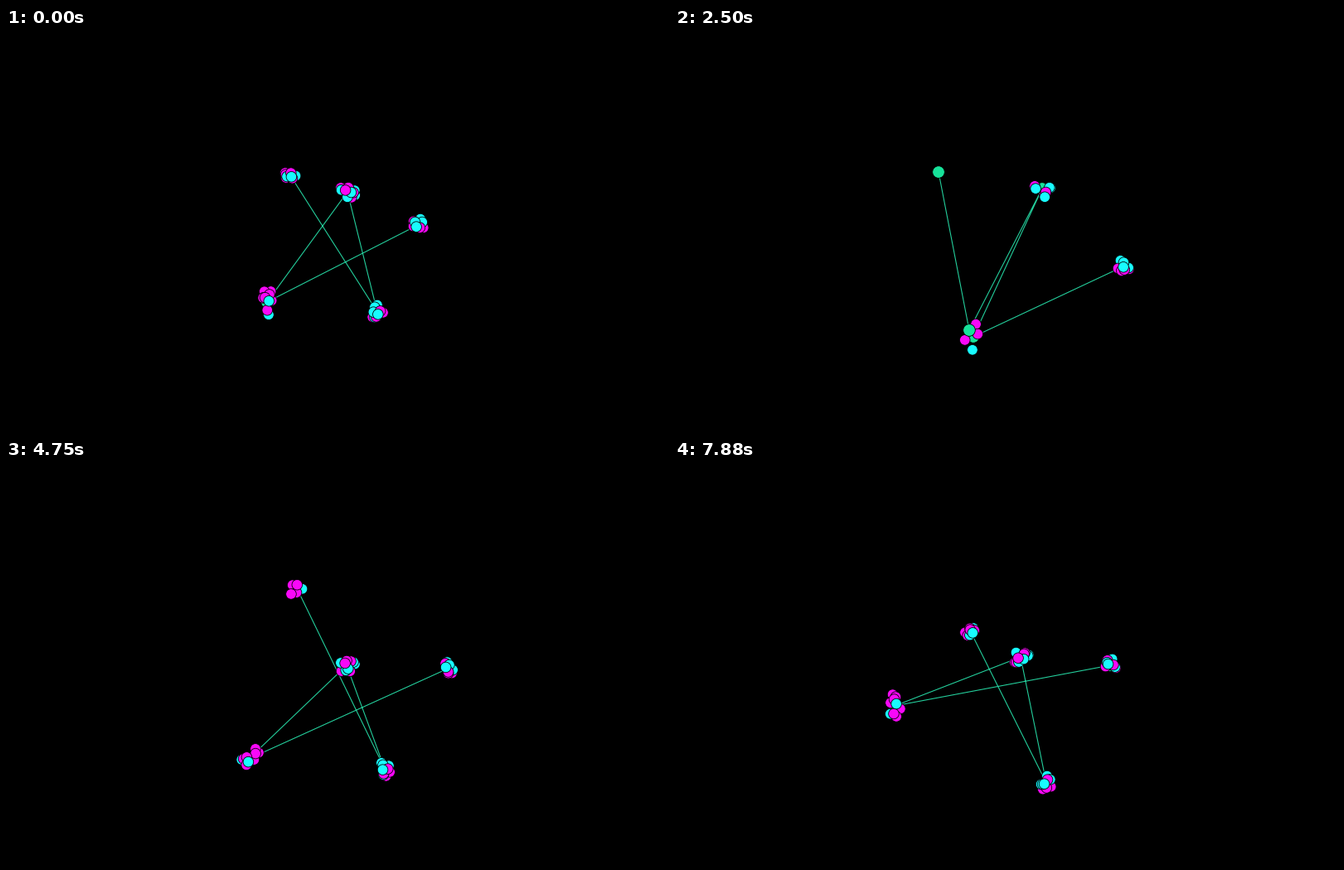
Recreate the animation shown at these times as a matplotlib script. Size 800 by 488 pixels, loop 8 s.

```python
import numpy as np
import matplotlib.pyplot as plt
from matplotlib.animation import FuncAnimation

W, H, DPI = 800, 488, 100
FRAMES, INTERVAL = 64, 125
HOLD_TICKS = 5
GREEN, LINE = "#17e29a", "#24cf9c"
DOT_COLORS = {"m": "#f808f8", "c": "#18fbff"}
NODE_R, DOT_R = 7.3, 6.3
TICKS = [9, 20, 27, 38, 48, 58, 63]


class Node:
    def __init__(self, seed, hold, points, extra, appears, colors, spread, first, step):
        self.hold = np.array(hold, float)
        self.appears = appears
        keys = [(t, *p) for t, p in zip(TICKS[-len(points):], points)] + extra
        keys = np.array(sorted(keys), float)
        self.times, self.pts = keys[:, 0], keys[:, 1:]
        self.slopes = np.gradient(self.pts, self.times, axis=0)
        rng = np.random.default_rng(seed)
        n = len(colors)
        k = np.arange(n)
        self.colors = [DOT_COLORS[c] for c in colors]
        self.born = first + np.maximum(0, k - 1) * step
        angle = 2.4 * k + rng.uniform(0, 6.28)
        self.base = (np.sqrt((n - k) / n) * np.exp(1j * angle))
        self.spread = spread
        self.entry = 32 * np.exp(1j * rng.uniform(0, 6.28, n))
        self.speed = rng.uniform(0.15, 0.4, n)
        self.phase = rng.uniform(0, 6.28, n)

    def center(self, t):
        """Smooth cubic curve through the waypoints."""
        times, pts, slopes = self.times, self.pts, self.slopes
        t = max(t, times[0])
        i = int(np.clip(np.searchsorted(times, t, "right") - 1, 0, len(times) - 2))
        span = times[i + 1] - times[i]
        u = (t - times[i]) / span
        return ((1 + 2 * u) * (1 - u) ** 2 * pts[i]
                + u * (1 - u) ** 2 * span * slopes[i]
                + u * u * (3 - 2 * u) * pts[i + 1]
                + u * u * (u - 1) * span * slopes[i + 1])

    def cluster(self, t):
        """Offsets of the dots once they have settled."""
        turn = np.exp(0.8j * np.sin(self.speed * t + self.phase))
        z = self.base * turn
        flat = z.real * self.spread[0] + 1j * z.imag * self.spread[1]
        if self.spread[1] > 2 * self.spread[0]:
            flat = flat * np.exp(1j * np.interp(t, [27, 38, 48, 60], [0, 0.7, 0.6, 0]))
        return flat

    def discs(self, t):
        held = t < HOLD_TICKS
        center = self.hold if held else self.center(t)
        out = [(center, NODE_R, GREEN)]
        settled = self.cluster(t)
        for k, color in enumerate(self.colors):
            if not held and t < self.born[k]:
                continue
            away = 0 if held else np.exp(-(t - self.born[k]) / 0.9)
            z = self.entry[k] * away + settled[k] * (1 - away)
            out.append((center + (z.real, z.imag), DOT_R, color))
        return out


nodes = [
    Node(1, (343, 178),
         [(318, 174), (320, 171), (351, 155), (333, 164), (350, 160), (357, 208)],
         [], 17, "mcmmmcmc", (7, 6), 28, 3),
    Node(2, (448, 343),
         [(355, 365), (377, 247), (457, 373), (492, 342), (462, 397), (448, 390)],
         [(12, 305, 262)], 12, "mcmccmcmc", (8, 9), 20.5, 1.5),
    Node(3, (412, 198),
         [(342, 157), (443, 194), (463, 213), (411, 248), (405, 291),
          (414, 254), (417, 238)],
         [], 8, "cmcmcmcmcm", (10, 10), 10, 1.7),
    Node(4, (315, 331),
         [(394, 323), (360, 373), (368, 417), (293, 361), (320, 403),
          (312, 330), (265, 297)],
         [(6, 380, 455), (11, 300, 350), (22, 264, 370), (34, 290, 362)],
         6, "mcmmmmmmc", (7, 17), 9, 3.3),
    Node(5, (497, 238),
         [(544, 264), (541, 288), (533, 330), (533, 252), (509, 292),
          (528, 244), (525, 248)],
         [(5, 554, 290)], 5, "cmmcmcmc", (8, 8), 10, 1.3),
]
nodes[3].entry[:2] = 2 - 38j, -3 + 56j

fig = plt.figure(figsize=(W / DPI, H / DPI), dpi=DPI, facecolor="black")
ax = fig.add_axes([0, 0, 1, 1])
ax.set_xlim(0, W)
ax.set_ylim(H, 0)
ax.axis("off")
px = 72 / DPI
links, = ax.plot([], [], color=LINE, lw=1.1 * px, zorder=1)
disc_art = ax.scatter([], [], edgecolors="black", linewidths=0.8 * px, zorder=2)


def update(tick):
    shown = [n for n in reversed(nodes) if tick < HOLD_TICKS or tick >= n.appears]
    groups = [n.discs(tick) for n in shown]
    chain = np.array([g[0][0] for g in groups])
    links.set_data(chain[:, 0], chain[:, 1])
    centers, radii, colors = zip(*[d for g in groups for d in g])
    disc_art.set_offsets(np.array(centers))
    disc_art.set_sizes((2 * np.array(radii) * px) ** 2)
    disc_art.set_facecolors(colors)
    return links, disc_art


anim = FuncAnimation(fig, update, frames=FRAMES, interval=INTERVAL,
                     repeat=True, repeat_delay=0, blit=False)
plt.show()
```
